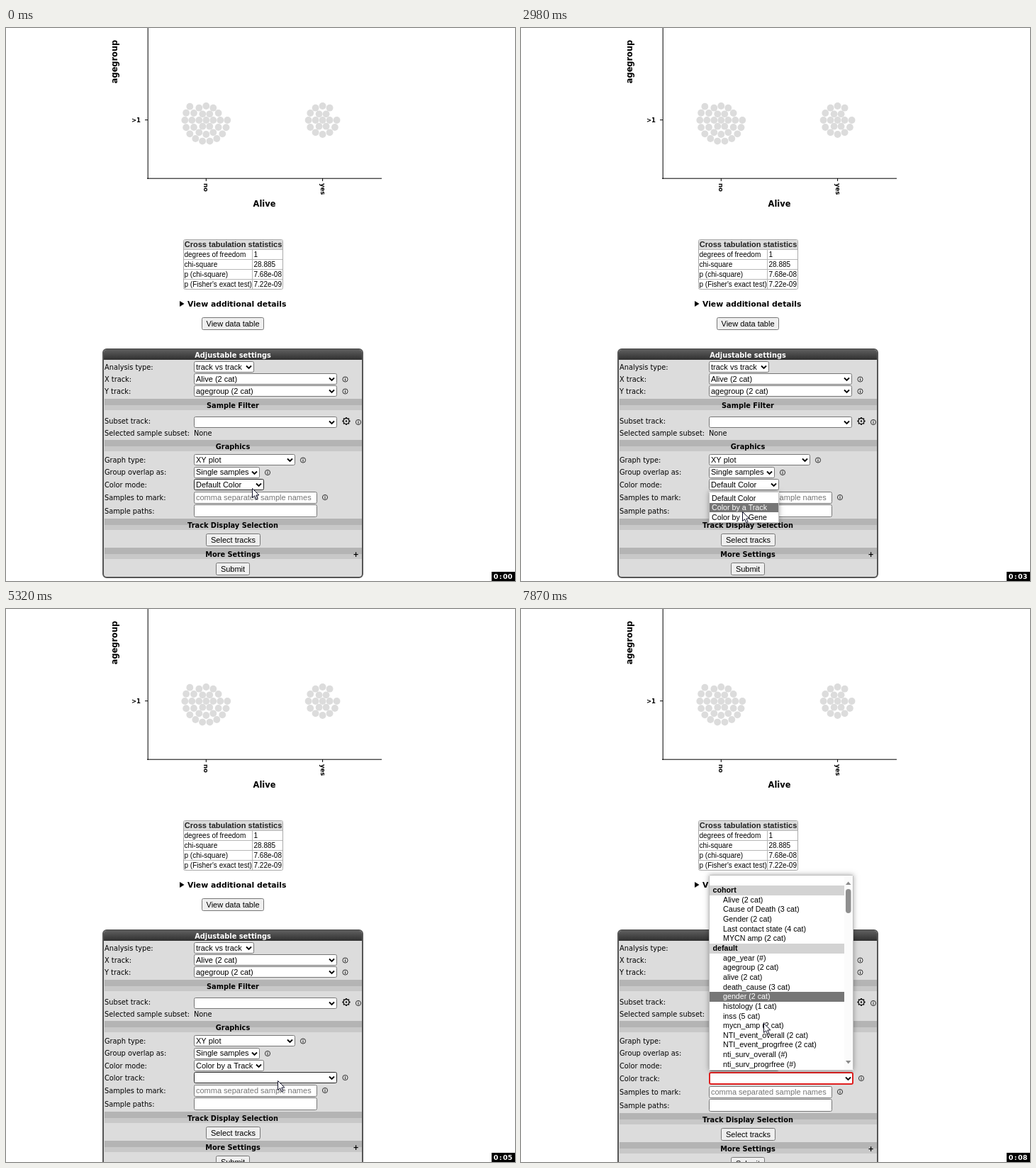
These frames come from a looping animation (718 by 780 pixels, 8 s). An HTML page with a canvas:

```html
<!DOCTYPE html>
<html lang="en">
<head>
<meta charset="utf-8">
<title>Adjustable settings</title>
<style>
html, body { margin: 0; width: 100%; height: 100%; overflow: hidden; background: #fff; }
canvas { display: block; }
</style>
</head>
<body>
<canvas id="stage" width="718" height="780"></canvas>
<script>
const ctx = document.getElementById('stage').getContext('2d');
const LOOP = 8000;
const SANS = '"DejaVu Sans", Verdana, sans-serif';
const ARIAL = '"Liberation Sans", Arial, sans-serif';
const LABEL = '9.8px ' + SANS;
const HEAD = 'bold 9.8px ' + SANS;
const FIELD = '11px ' + ARIAL;
const ITEM = '10.7px ' + ARIAL;
const CELL = '10px ' + ARIAL;
const HILITE = '#767676';
const LEFT = 265;

const MODES = ['Default Color', 'Color by a Track', 'Color by a Gene'];
// a leading "*" marks a group heading
const TRACKS = ['', '*cohort', 'Alive (2 cat)', 'Cause of Death (3 cat)', 'Gender (2 cat)',
  'Last contact state (4 cat)', 'MYCN amp (2 cat)', '*default', 'age_year (#)',
  'agegroup (2 cat)', 'alive (2 cat)', 'death_cause (3 cat)', 'gender (2 cat)',
  'histology (1 cat)', 'inss (5 cat)', 'mycn_amp (2 cat)', 'NTI_event_overall (2 cat)',
  'NTI_event_progrfree (2 cat)', 'nti_surv_overall (#)', 'nti_surv_progrfree (#)'];

// [time, x, y] of the pointer
const POINTER = [[0, 347, 649], [130, 337, 644], [270, 337, 637], [400, 338, 630],
  [530, 339, 632], [650, 337, 639], [790, 338, 639], [1210, 337, 633], [1340, 335, 628],
  [2320, 339, 633], [2450, 345, 641], [2580, 344, 644], [2710, 335, 657], [2840, 320, 673],
  [2980, 312, 682], [3110, 319, 680], [3240, 320, 681], [3380, 337, 688], [3790, 336, 683],
  [3950, 338, 681], [4080, 340, 677], [4230, 342, 676], [4490, 352, 669], [4620, 363, 665],
  [4750, 371, 663], [4900, 374, 664], [5190, 378, 664], [5320, 383, 665], [5590, 386, 665],
  [5720, 389, 664], [6530, 390, 663], [7590, 382, 625], [7720, 350, 549],
  [7870, 342, 584]];
const SECONDS = [930, 1900, 2850, 3810, 4920, 5870, 6800, 7860];
const MODE_ROW = [[2580, 0], [2840, 1], [3380, 2], [3950, 1]];
const TRACK_ROW = [[5860, 0], [7590, 18], [7720, 12]];

const at = (keys, t) => keys.filter(k => k[0] <= t).pop();

function text(s, x, y, font, color = '#000', align = 'left') {
  ctx.font = font;
  ctx.fillStyle = color;
  ctx.textAlign = align;
  ctx.fillText(s, x, y);
}

function rect(x, y, w, h, color) {
  ctx.fillStyle = color;
  ctx.fillRect(x, y, w, h);
}

function line(points, color = '#000', width = 1) {
  ctx.beginPath();
  points.forEach(p => ctx.lineTo(...p));
  ctx.strokeStyle = color;
  ctx.lineWidth = width;
  ctx.stroke();
}

function shape(points, fill) {
  ctx.beginPath();
  points.forEach(p => ctx.lineTo(...p));
  ctx.closePath();
  ctx.fillStyle = fill;
  ctx.fill();
}

function circle(x, y, r) {
  ctx.beginPath();
  ctx.arc(x, y, r, 0, 7);
}

function box(x, y, r, b, { fill = '#fff', stroke = '#767676', width = 1, radius = 2 } = {}) {
  const h = width / 2;
  ctx.beginPath();
  ctx.roundRect(x + h, y + h, r - x - width, b - y - width, radius);
  ctx.fillStyle = fill;
  ctx.fill();
  ctx.strokeStyle = stroke;
  ctx.lineWidth = width;
  ctx.stroke();
}

function turned(s, x, y, angle, font, align) {
  ctx.save();
  ctx.translate(x, y);
  ctx.rotate(angle);
  text(s, 0, 0, font, '#000', align);
  ctx.restore();
}

// concentric rings with 6, 12, 18 ... places
function cluster(cx, cy, count) {
  let ring = 0, slot = 0;
  for (let i = 0; i < count; i++) {
    const a = ring ? slot / (6 * ring) * 2 * Math.PI : 0;
    circle(cx + 10 * ring * Math.cos(a), cy + 10 * ring * Math.sin(a), 4.9);
    ctx.fillStyle = '#dcdcdc';
    ctx.fill();
    if (++slot >= 6 * ring) { ring++; slot = 0; }
  }
}

function plot() {
  cluster(282.3, 130, 31);
  cluster(446.6, 130, 18);
  line([[200.2, 0], [200.2, 213]]);
  line([[199, 212.2], [530, 212.2]]);
  line([[196, 129.7], [200, 129.7]]);
  for (const x of [282.3, 446.6]) line([[x, 212], [x, 216]]);
  const small = 'bold 8.5px ' + SANS, big = 'bold 11.4px ' + SANS;
  text('>1', 190, 133, small, '#000', 'right');
  turned('no', 279, 219, Math.PI / 2, small, 'left');
  turned('yes', 444, 219, Math.PI / 2, small, 'left');
  turned('agegroup', 156.5, 47.5, -Math.PI / 2, big, 'center');
  text('Alive', 364.5, 252, big, '#000', 'center');
}

function stats() {
  const rows = [['degrees of freedom', '1'], ['chi-square', '28.885'],
    ['p (chi-square)', '7.68e-08'], ["p (Fisher's exact test)", '7.22e-09']];
  box(250, 298, 391, 369, { stroke: '#aaa' });
  rect(251, 299, 139, 13, '#dcdcdc');
  text('Cross tabulation statistics', 320.5, 309, 'bold 11px ' + ARIAL, '#222', 'center');
  rows.forEach(([name, value], i) => {
    const y = 312.5 + 14 * i;
    line([[251, y], [390, y]], '#b8b8b8');
    text(name, 251.5, y + 10.5, CELL);
    text(value, 349.5, y + 10.5, CELL);
  });
  line([[347.5, 313], [347.5, 368]], '#b8b8b8');
  shape([[245, 385], [251.5, 389], [245, 393]], '#000');
  text('View additional details', 256, 393, 'bold 10.8px ' + SANS);
  button('View data table', 276, 408, 364);
}

function button(s, x, y, r) {
  box(x, y, r, y + 18, { fill: '#efefef' });
  text(s, (x + r) / 2, y + 13, FIELD, '#000', 'center');
}

function select(s, r, y, base, style = {}, b = y + 16) {
  box(LEFT, y, r, b, style);
  text(s, 268, base, FIELD);
  const m = (y + b) / 2;
  line([[r - 11, m - 1.5], [r - 7.5, m + 2], [r - 4, m - 1.5]], '#000', 1.8);
}

function info(x, y) {
  circle(x, y, 3.6);
  ctx.strokeStyle = '#222';
  ctx.lineWidth = 0.9;
  ctx.stroke();
  rect(x - 0.5, y - 0.6, 1, 2.8, '#222');
  rect(x - 0.5, y - 2.2, 1, 1, '#222');
}

function gear(x, y) {
  for (let i = 0; i < 8; i++) {
    const a = i * Math.PI / 4, c = Math.cos(a), s = Math.sin(a);
    line([[x + 4 * c, y + 4 * s], [x + 5.6 * c, y + 5.6 * s]], '#111', 1.8);
  }
  circle(x, y, 4);
  ctx.lineWidth = 1.3;
  ctx.stroke();
  circle(x, y, 1.2);
  ctx.fillStyle = '#111';
  ctx.fill();
}

function section(s, c) {
  rect(139, c - 9, 363, 9, '#b4b4b4');
  rect(139, c, 363, 7, '#c8c8c8');
  text(s, 320, c + 4, HEAD, '#000', 'center');
}

const label = (s, y) => text(s, 139, y, LABEL);

function panel(s) {
  const { dy, x, y } = s;
  const hover = (r, top, bottom) =>
    !s.open && x >= LEFT && x <= r && y >= top && y <= bottom ? { stroke: '#222' } : {};
  box(136, 452, 504, 776 + dy, { fill: '#dcdcdc', stroke: '#555', width: 2, radius: 5 });
  const shade = ctx.createLinearGradient(0, 453, 0, 468);
  shade.addColorStop(0, '#606060');
  shade.addColorStop(1, '#303030');
  ctx.beginPath();
  ctx.roundRect(138, 454, 364, 14, [4, 4, 0, 0]);
  ctx.fillStyle = shade;
  ctx.fill();
  text('Adjustable settings', 320, 465, HEAD, '#fff', 'center');

  label('Analysis type:', 482);
  select('track vs track', 350, 470, 482);
  label('X track:', 499);
  select('Alive (2 cat)', 467, 487, 499);
  label('Y track:', 516);
  select('agegroup (2 cat)', 467, 504, 516);
  info(478.5, 495.5);
  info(478.5, 512.5);

  section('Sample Filter', 532);
  label('Subset track:', 558);
  select('', 467, 548, 559);
  gear(480, 554.5);
  info(497, 556);
  label('Selected sample subset:', 575);
  text('None', 265, 575, LABEL);

  section('Graphics', 590);
  label('Graph type:', 613);
  select('XY plot', 408, 601, 613);
  info(419, 609.5);
  label('Group overlap as:', 630);
  select('Single samples', 358, 619, 630, hover(357, 619, 634));
  info(369, 627);
  label('Color mode:', 648);
  select(s.mode, 364, 636, 648,
    s.focus ? { stroke: '#000', width: 2 } : hover(363, 636, 651));

  if (dy) {
    const red = dy > 17;
    label('Color track:', red ? 666 : 665);
    if (red) select('', 469, 653, 666, { stroke: '#e02020', width: 2 }, 671);
    else select('', 467, 653, 665, hover(467, 653, 669));
    info(red ? 480 : 478.5, red ? 662 : 661);
  }
  label('Samples to mark:', 666 + dy);
  box(LEFT, 654 + dy, 439, 671 + dy, dy ? {} : hover(439, 655, 670));
  text('comma separated sample names', 268, 666 + dy, FIELD, '#757575');
  info(450, 662 + dy);
  label('Sample paths:', 685 + dy);
  box(LEFT, 672 + dy, 439, 690 + dy);

  section('Track Display Selection', 701 + dy);
  button('Select tracks', 282, 713 + dy, 359);
  section('More Settings', 742 + dy);
  text('+', 493.5, 746 + dy, HEAD, '#000', 'center');
  button('Submit', 296, 754 + dy, 344);
}

function popup(y, r, b) {
  ctx.save();
  ctx.shadowColor = 'rgba(0,0,0,.35)';
  ctx.shadowBlur = 7;
  rect(LEFT, y, r - LEFT, b - y, '#fff');
  ctx.restore();
  box(LEFT, y, r, b, { stroke: '#c0c0c0', radius: 1 });
}

function modeList(row) {
  popup(654, 364, 698);
  MODES.forEach((s, i) => {
    const top = Math.round(656.5 + 13.6 * i);
    if (i === row) rect(266, top, 97, 13, HILITE);
    text(s, 269, top + 10, ITEM, i === row ? '#fff' : '#000');
  });
}

function trackList(row) {
  popup(375, 469, 651);
  TRACKS.forEach((s, i) => {
    const group = s[0] === '*', lit = i === row;
    const top = Math.round(376.4 + 13.65 * i), bottom = Math.round(390.05 + 13.65 * i);
    if (group || lit) rect(266, top, 190, bottom - top, lit ? HILITE : '#d3d3d3');
    text(group ? s.slice(1) : s, group ? 270.5 : 285, top + 10,
      (group ? 'bold ' : '') + ITEM, lit ? '#fff' : '#000');
  });
  rect(456, 376, 12, 274, '#fbfbfb');
  ctx.beginPath();
  ctx.roundRect(458, 395, 7.5, 34, 3.7);
  ctx.fillStyle = '#8f8f8f';
  ctx.fill();
  shape([[458, 389], [461.7, 384.5], [465.5, 389]], '#8a8a8a');
  shape([[458, 637], [461.7, 641.5], [465.5, 637]], '#8a8a8a');
}

function arrow(x, y) {
  const tip = [[0, 0], [0, 13], [3.1, 10.3], [5.4, 15.3], [7.6, 14.4], [5.3, 9.6], [9.5, 9.3]]
    .map(([a, b]) => [x + 0.5 + a, y + 0.5 + b]);
  shape(tip, '#fff');
  ctx.strokeStyle = '#101028';
  ctx.lineWidth = 1;
  ctx.stroke();
}

function beam(x, y) {
  line([[x + 0.5, y - 5], [x + 0.5, y + 6]]);
  for (const b of [y - 5.5, y + 6.5]) line([[x - 2.5, b], [x + 3.5, b]]);
}

function clock(t) {
  const n = SECONDS.filter(s => s <= t).length;
  rect(685, 767, 33, 13, '#000');
  [...`0:0${n}`].forEach((c, i) =>
    text(c, 691 + 6.7 * i, 776.5, 'bold 9.5px ' + SANS, '#fff', 'center'));
}

function draw(t) {
  const [, x, y] = at(POINTER, t);
  const modeOpen = t >= 2580 && t < 4360, trackOpen = t >= 5860;
  rect(0, 0, 718, 780, '#fff');
  plot();
  stats();
  panel({
    x, y,
    open: modeOpen || trackOpen,
    dy: t < 5190 ? 0 : trackOpen ? 19 : 17,
    mode: MODES[t < 4360 ? 0 : 1],
    focus: t >= 4360 && t < 5190
  });
  if (modeOpen) modeList(at(MODE_ROW, t)[1]);
  if (trackOpen) trackList(at(TRACK_ROW, t)[1]);
  if (t >= 4490 && t < 5190) beam(x, y);
  else arrow(x, y);
  clock(t);
}

const start = performance.now();
function tick() {
  draw((performance.now() - start) % LOOP);
  requestAnimationFrame(tick);
}
tick();
</script>
</body>
</html>
```
